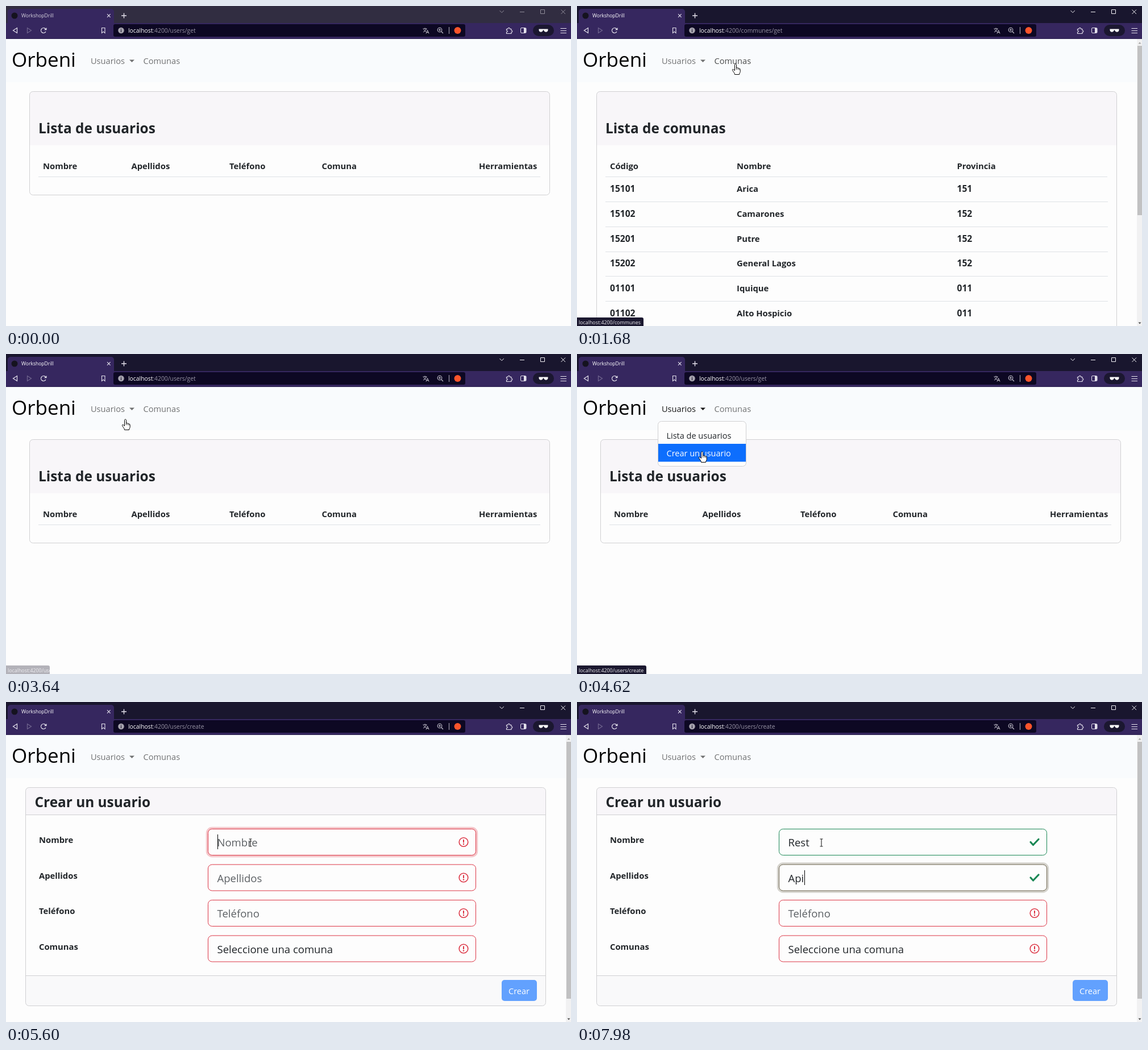
Write an HTML page with a canvas that moves like this. It is 994 px wide and 563 px high and loops after 8 s.

```html
<!DOCTYPE html>
<html lang="es">
<head>
<meta charset="utf-8">
<title>Usuarios</title>
<style>
html, body { margin: 0; width: 100%; height: 100%; overflow: hidden; background: #fdfdfd; }
canvas { display: block; width: 994px; height: 563px; }
</style>
</head>
<body>
<canvas id="stage" width="994" height="563"></canvas>
<script>
const ctx = document.getElementById('stage').getContext('2d');
const LOOP = 8000, TICK = 70;
const FAMILY = '"Open Sans", "Noto Sans", sans-serif';
const INK = '#212529', LINE = '#dee2e6', EDGE = '#d0d0d2', BG = '#fdfdfd', HEAD = '#f8f6f9';
const RED = [220, 53, 69], GREEN = [25, 135, 84];

// ---------- helpers ----------
function track(t, keys) {
  if (t <= keys[0][0]) return keys[0][1];
  for (let i = 1; i < keys.length; i++) {
    const [b, v] = keys[i], [a, u] = keys[i - 1];
    if (t <= b) return u + (v - u) * (t - a) / (b - a);
  }
  return keys[keys.length - 1][1];
}
function latest(t, steps) {
  let value = steps[0][1];
  for (const [at, v] of steps) if (t >= at) value = v;
  return value;
}
function rgba(c, a = 1) { return `rgba(${c.map(Math.round).join(',')},${a})`; }
function mix(a, b, k) { return a.map((v, i) => v + (b[i] - v) * k); }

function text(s, x, y, size, color = INK, weight = 400) {
  ctx.font = `${weight} ${size}px ${FAMILY}`;
  ctx.fillStyle = color;
  ctx.fillText(s, x, y);
}
function bold(s, x, y, size = 14.8) { text(s, x, y, size, INK, 700); }
function rect(x, y, w, h, color) {
  ctx.fillStyle = color;
  ctx.fillRect(x, y, w, h);
}
function box(x, y, w, h, r, fill, stroke) {
  ctx.beginPath();
  ctx.roundRect(x, y, w, h, r);
  if (fill) { ctx.fillStyle = fill; ctx.fill(); }
  if (stroke) { ctx.strokeStyle = stroke; ctx.lineWidth = 1; ctx.stroke(); }
}
function disc(x, y, r, color) {
  ctx.beginPath();
  ctx.arc(x, y, r, 0, 7);
  ctx.fillStyle = color;
  ctx.fill();
}
function ring(x, y, r, color, width, from = 0, to = Math.PI * 2) {
  ctx.beginPath();
  ctx.arc(x, y, r, from, to);
  ctx.strokeStyle = color;
  ctx.lineWidth = width;
  ctx.stroke();
}
function trace(d, stroke, width = 1.2, fill) {
  const p = new Path2D(d);
  if (fill) { ctx.fillStyle = fill; ctx.fill(p); }
  if (stroke) { ctx.strokeStyle = stroke; ctx.lineWidth = width; ctx.stroke(p); }
}

// ---------- browser ----------
function browser(active, path) {
  const pale = '#e4e1ec', ctrl = active ? '#f2f1f5' : '#8f8c99';
  rect(0, 0, 994, 31, active ? '#19162e' : '#312d41');
  rect(0, 30, 994, 28, '#36275f');
  box(3, 5, 187, 30, [5, 5, 0, 0], '#36275f');
  rect(0, 57, 994, 1, '#2b2050');

  disc(15, 17, 5.5, '#15131f');
  text('WorkshopDrill', 27, 20, 8.55, active ? '#fff' : '#d8d5e0');
  trace('M178 14.2l5.6 5.6M183.600 14.2l-5.600 5.6', pale, 1.1);
  trace('M203 17h9M207.500 12.500v9', pale, 1.4);
  trace('M868.500 8l3.700 3.700 3.700-3.700M904 10.500h8M940.500 6.500h7v7h-7zM976.500 6.500l7.500 7.500M984 6.500l-7.500 7.500', ctrl, 1);

  trace('M19.500 38.500v9l-7-4.500z', pale);
  trace('M37.500 38.500v9l7-4.500z', '#71668f');
  ring(66, 43, 4.4, pale, 1.3, .5, 5.6);
  trace('M71.500 38v4.300h-4.300z', null, 0, pale);
  trace('M168.500 38.500h5.500v9l-2.750-2.300-2.750 2.300z', pale, 1.1);

  box(189, 32, 619, 22, 3, '#0d0823');
  disc(202.500, 43, 5.3, '#a5a2ad');
  rect(202, 40, 1, 1.2, '#0d0823');
  rect(202, 42, 1, 4, '#0d0823');
  text('localhost', 215, 47, 10.35, '#fff');
  const hostWidth = ctx.measureText('localhost').width;
  text(':4200/' + path, 215 + hostWidth, 47, 10.35, '#9894a5');

  trace('M733.500 40h7M737 38.500v1.500M739.500 40c-1 3-3 4.500-5.500 6M735 41.500c1 2 2.500 3 4 3.700M739 48.500l2.500-6 2.500 6M740 46.500h3', '#c9c6d2', 1);
  ring(763, 42, 3.8, '#c9c6d2', 1.1);
  trace('M766 45l3 3M761 42h4M763 40v4', '#c9c6d2', 1.1);
  rect(779, 37, 1, 12, '#b6b3c0');
  disc(794.500, 43, 6, '#fb542b');

  trace('M880.500 40.500h2.500c-.5-3 4-3 3.500 0h2.500v2.500c2.500-.5 2.500 3.500 0 3v2.500h-8.500v-2.500c2.500 0 2.500-3 0-3z', pale, 1.1);
  box(905.500, 38.500, 9.500, 9, 1.5, null, pale);
  rect(911, 39, 4, 8, pale);
  box(927, 33, 37, 20, 10, '#1b1730');
  trace('M937.500 40.500h16v1.500c0 5-6.500 5-7.200 .5h-1.600c-.7 4.500-7.200 4.500-7.200-.5z', null, 0, '#fff');
  trace('M975.500 39.500h10.500M975.500 43.500h10.500M975.500 47.500h10.500', pale, 1.2);
}

function scrollbar(end) {
  rect(985, 58, 9, 505, '#f1f1f2');
  rect(986, 70, 8, end - 70, '#c1c1c2');
  trace('M987.500 66.500h5l-2.500-3z', null, 0, '#a3a3a3');
  trace('M987.500 556.500h5l-2.500 3z', null, 0, '#505050');
}

function navbar(t) {
  const users = track(t, [[490, .55], [560, .7], [630, .7], [770, .55], [2240, .55], [2380, .7],
    [2520, .7], [2590, .9], [3290, .9], [3430, .55], [3640, .55], [3780, .7], [3990, .7],
    [4060, .9], [4690, .9], [4830, .55]]);
  const towns = track(t, [[630, .55], [770, .7], [2520, .7], [2730, .55]]);
  rect(0, 58, 994, 76, '#f9fbfd');
  text('Orbeni', 10, 107, 35, '#000');
  text('Usuarios', 149, 102, 14.6, `rgba(0,0,0,${users})`);
  trace('M217 94.500h9l-4.500 4.500z', null, 0, `rgba(0,0,0,${users})`);
  text('Comunas', 241.500, 102, 14.6, `rgba(0,0,0,${towns})`);
}

// ---------- pages ----------
function listCard(x, title, heads, bottom) {
  box(x + .5, 150.500, 915, bottom - 150, 6, BG);
  box(x + .5, 150.500, 915, 94.500, [6, 6, 0, 0], HEAD);
  box(x + .5, 150.500, 915, bottom - 150, 6, null, EDGE);
  bold(title, x + 16, 224, 24.4);
  for (const [label, at] of heads) bold(label, at, 287);
  rect(x + 16, 300, 883, 1, LINE);
}
function usersPage() {
  listCard(41, 'Lista de usuarios', [['Nombre', 65], ['Apellidos', 220.500], ['Teléfono', 393],
    ['Comuna', 555.500], ['Herramientas', 832]], 332);
}
function emptyTowns() {
  listCard(41, 'Lista de comunas', [['Código', 65], ['Nombre', 330], ['Provincia', 624]], 332);
}
const TOWNS = ['15101 Arica 151', '15102 Camarones 152', '15201 Putre 152',
  '15202 General Lagos 152', '01101 Iquique 011', '01102 Alto Hospicio 011'];
function townsPage() {
  listCard(34, 'Lista de comunas', [['Código', 58], ['Nombre', 281], ['Provincia', 668.500]], 600);
  TOWNS.forEach((row, i) => {
    const y = 327 + 43.8 * i;
    bold(row.slice(0, 5), 58, y, 15.6);
    bold(row.slice(6, -4), 281, y);
    bold(row.slice(-3), 668.500, y, 15.6);
    rect(50, Math.round(344 + 43.8 * i), 884, 1, LINE);
  });
  scrollbar(368);
}

function field(i, label, hint, { value = '', valid = 0, focus = 0, caret = false, dark = false } = {}) {
  const y = 223 + 62.5 * i, tone = mix(RED, GREEN, valid), mid = y + 23.5;
  bold(label, 58, y + 25);
  if (focus > 0) {
    const g = 3.7 * focus;
    box(355.500 - g, y + .5 - g, 471 + 2 * g, 46 + 2 * g, 7 + g, rgba(tone, .27));
  }
  box(355.500, y + .5, 471, 46, 7, BG, rgba(tone));
  text(value || hint, 371.500, y + 31, 18.5, value || dark ? INK : '#5c6064');
  if (caret) {
    const w = value ? ctx.measureText(value).width : 0;
    rect(Math.round(372 + w), Math.round(y + 10), 1, 26, '#000');
  }
  if (valid > 0) {
    ctx.lineCap = ctx.lineJoin = 'round';
    trace(`M798 ${mid}l4.500 5 9.500-10`, rgba(GREEN), 3.2);
    ctx.lineCap = 'butt';
    ctx.lineJoin = 'miter';
  } else {
    ring(805, mid, 7.8, rgba(RED), 1.6);
    rect(804, mid - 4.500, 2, 5.500, rgba(RED));
    disc(805, mid + 3.500, 1.2, rgba(RED));
  }
}
function createPage(t) {
  const moved = track(t, [[6930, 0], [7000, .15], [7070, .6], [7140, 1]]);
  const name = latest(t, [[0, ''], [6160, 'R'], [6440, 'Re'], [6580, 'Res'], [6720, 'Rest']]);
  const last = latest(t, [[0, ''], [7420, 'A'], [7770, 'Ap'], [7910, 'Api']]);

  box(34.500, 150.500, 915, 384, 6, BG);
  box(34.500, 150.500, 915, 48.500, [6, 6, 0, 0], HEAD);
  box(34.500, 481.500, 915, 53, [0, 0, 6, 6], '#f9f9fa');
  box(34.500, 150.500, 915, 384, 6, null, EDGE);
  rect(35, 198, 914, 1, EDGE);
  rect(35, 481, 914, 1, EDGE);
  bold('Crear un usuario', 50.500, 185, 24.4);

  field(0, 'Nombre', 'Nombre', {
    value: name,
    valid: track(t, [[6510, 0], [6580, .1], [6650, .57], [6720, 1]]),
    focus: track(t, [[5460, 0], [5530, .5], [5600, 1]]) * (1 - moved),
    caret: (t >= 5530 && t < 5950) || (t >= 6160 && t < 7000)
  });
  field(1, 'Apellidos', 'Apellidos', {
    value: last,
    valid: track(t, [[7840, 0], [7910, .1], [7980, .57]]),
    focus: moved,
    caret: t >= 7000
  });
  field(2, 'Teléfono', 'Teléfono');
  field(3, 'Comunas', 'Seleccione una comuna', { dark: true });

  box(872, 489, 62, 37, 5, '#62a1fe');
  text('Crear', 884, 514, 14.5, '#fff');
  scrollbar(522);
}

// ---------- overlays ----------
function menu(t, y) {
  const open = (t >= 2590 && t < 3360) || (t >= 4060 && t < 4760);
  if (!open) return;
  box(142.500, 118.500, 155, 79, 6, BG, EDGE);
  ['Lista de usuarios', 'Crear un usuario'].forEach((label, i) => {
    const top = 126.500 + 31.500 * i;
    const over = y >= top && y < top + 31.500;
    const pressed = over && (t >= 4620 || (t >= 3290 && t < 3360));
    if (over) rect(143, top, 154, 31.500, pressed ? '#0d6efd' : '#f4f5f7');
    text(label, 157.500, 148.500 + 31.500 * i, 14.5, pressed ? '#fff' : INK);
  });
}

function status(t) {
  const alpha = track(t, [[840, 0], [1050, 1], [3430, 1], [3640, .33], [3850, 1], [4830, 1], [5040, 0]]);
  if (alpha <= 0) return;
  const path = latest(t, [[0, 'communes'], [2240, '#'], [3010, 'users/get'], [3710, '#'],
    [4270, 'users/get'], [4410, 'users/create']]);
  const label = 'localhost:4200/' + path;
  ctx.save();
  ctx.globalAlpha = alpha;
  ctx.font = `400 8.85px ${FAMILY}`;
  const shrunk = t >= 3640 && t < 3710;
  const w = shrunk ? 77 : Math.round(ctx.measureText(label).width + 8);
  box(0, 548, w, 15, [0, 3, 0, 0], '#1c1930');
  ctx.clip();
  ctx.globalAlpha = Math.min(1, alpha * 3);
  text(label, 3, 560, 8.85, '#f1f0f4');
  ctx.restore();
}

const PATH = [[140, 974, 40], [280, 735, 62], [420, 395, 95], [490, 235, 100], [560, 199, 101],
  [630, 222, 101], [700, 260, 102], [770, 279, 102], [1960, 279, 102], [2100, 255, 101],
  [2240, 224, 102], [2380, 212, 102], [2800, 212, 102], [2870, 212, 118], [3150, 211, 146],
  [3430, 211, 146], [3640, 210, 115], [3850, 210, 102], [4060, 210, 102], [4340, 214, 140],
  [4550, 220, 172], [4760, 220, 172], [4970, 278, 195], [5250, 392, 238], [5460, 430, 247]];
const pointerX = t => track(t, PATH.map(k => [k[0], k[1]]));
const pointerY = t => track(t, PATH.map(k => [k[0], k[2]]));

function pointer(t, x, y) {
  const kind = latest(t, [[0, ''], [140, 'arrow'], [490, 'hand'], [3430, 'arrow'], [3640, 'hand'],
    [4760, 'arrow'], [5180, 'beam']]);
  ctx.save();
  ctx.translate(Math.round(x), Math.round(y));
  if (kind === 'arrow') {
    trace('M.5 .5v15.500l3.600-3.400 2.400 5.600 2.400-1-2.400-5.500h5z', '#000', 1, '#fff');
  } else if (kind === 'hand') {
    trace('M-1.500 1.500c0-2 3-2 3 0v5.500c1-.9 2.500-.6 2.700 .5 1-.5 2.200-.2 2.300 .8 1-.3 1.700 .2 1.700 1.200v4c0 2-1.700 2.500-1.700 5h-8c0-2.500-2-4-3.700-7-1-2 .5-2.700 1.700-1.700l2 1.700z', '#000', 1, '#fff');
    trace('M1.500 7v3M4.200 7.700v2.500M6.500 8.500v2', '#000', .8);
  } else if (kind === 'beam') {
    trace('M-2.500-6h2l.5 .5 .5-.5h2M0-5.500v12M-2.500 7h2l.5-.5 .5 .5h2', '#222', 1.1);
  }
  ctx.restore();
}

// ---------- frame ----------
const PAGES = [[0, usersPage], [1260, emptyTowns], [1680, townsPage], [3360, usersPage], [4760, createPage]];
const URLS = [[0, 'users/get'], [1260, 'communes/get'], [3360, 'users/get'], [4760, 'users/create']];

function draw(now) {
  const t = Math.floor(now % LOOP / TICK) * TICK;
  const x = pointerX(t), y = pointerY(t);
  rect(0, 0, 994, 563, BG);
  navbar(t);
  latest(t, PAGES)(t);
  browser(t >= 1190, latest(t, URLS));
  menu(t, y);
  status(t);
  pointer(t, x, y);
}

const start = performance.now();
function loop() {
  draw(performance.now() - start);
  requestAnimationFrame(loop);
}
loop();
</script>
</body>
</html>
```
